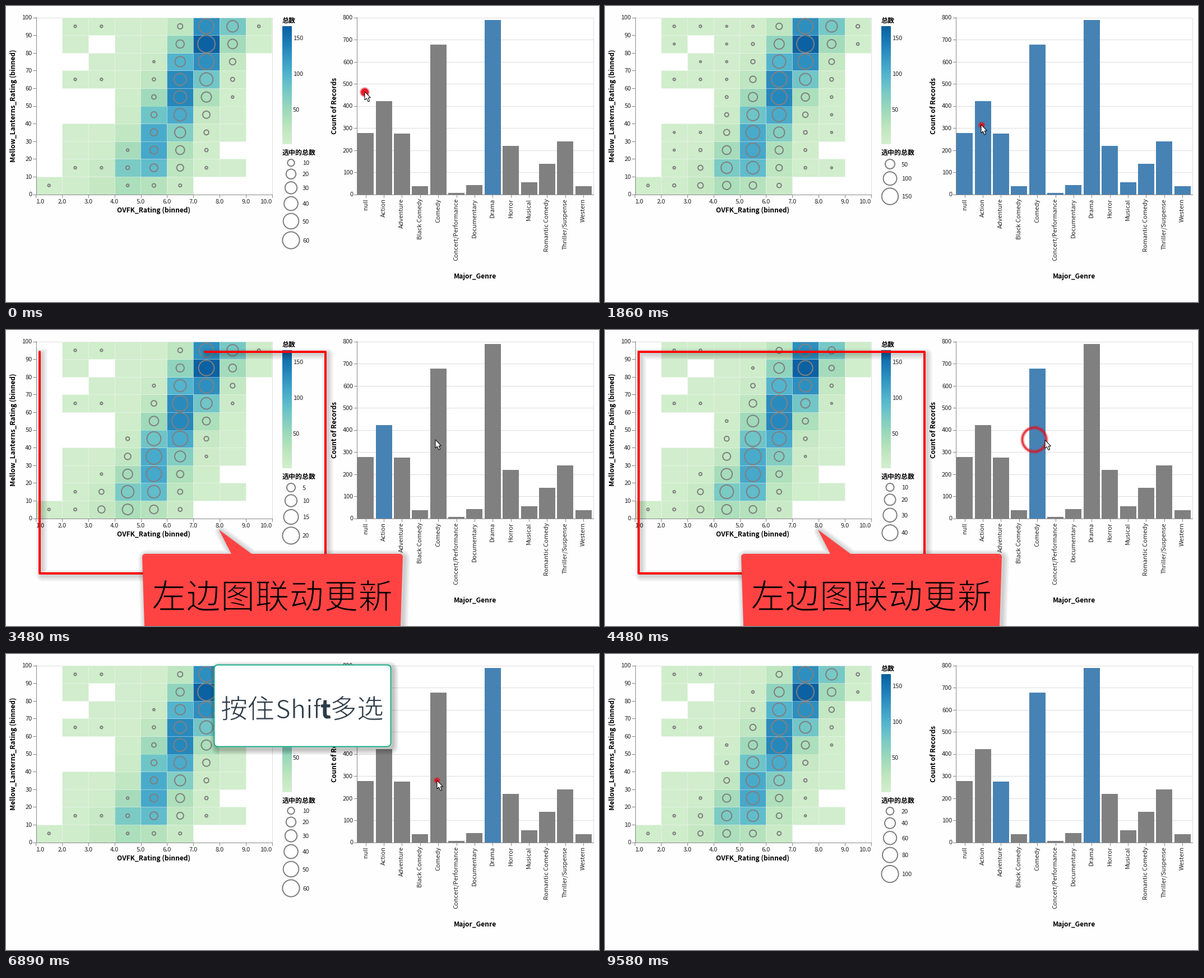
Animation, 1058 px wide and 529 px high, one loop 9.65 s. Source, as a matplotlib script:

```python
import numpy as np
import matplotlib.pyplot as plt
from matplotlib.animation import FuncAnimation
from matplotlib.collections import PolyCollection
from matplotlib.colors import LinearSegmentedColormap
from matplotlib.patches import Circle, FancyBboxPatch, PathPatch, Polygon, Rectangle
from matplotlib.path import Path
from matplotlib.patheffects import Stroke

W, H, LOOP, STEP = 1058, 529, 9650, 50
PT = 0.72  # points per pixel at 100 dpi
R_MAX = 15.5
GRAY, BLUE, INK = "#808080", "#4682b4", "#222222"
AXIS, GRID = "#888888", "#dddddd"
CJK = "Noto Sans CJK JP"

# ---------- data ----------

# filled columns of each heatmap row, bottom row first, with one hole
FIRST, LAST = [0, 1, 1, 1, 3, 3, 1, 2, 1, 1], [5, 7, 6, 7, 7, 7, 7, 7, 8, 8]
ROWS, COLS = np.array([(r, c) for r in range(10) for c in range(FIRST[r], LAST[r] + 1)
                       if (r, c) != (8, 2)]).T
LOOSE = (COLS == 0) | ((COLS <= 2) & np.isin(ROWS, (1, 6, 9)))


def ridge(start, slope, floor, heights):
    """Circle radii: a bell per row whose centre drifts right with the score."""
    height = np.interp(ROWS, [0, 1, 4, 8, 9], heights)
    width = 1.4 + 1.6 * np.exp(-ROWS)
    radii = floor + height * np.exp(-(COLS - start - slope * ROWS) ** 2 / width)
    radii = np.where(LOOSE, np.maximum(radii, 2.2), radii)
    return np.where(radii > 1.65, np.minimum(radii, R_MAX), 0)


everything = ridge(3.3, 0.33, 1.7, (5.8, 10.3, 11.8, 13.8, 12.6))
drama = ridge(4.1, 0.245, 0.6, (2.6, 6.8, 10.6, 14.9, 13.6))
action = ridge(3.15, 0.355, 0.6, (9, 12, 14.8, 13.2, 13))
comedy = ridge(3.1, 0.33, 0.7, (8, 12.5, 14.8, 13, 10.5))
pair = ridge(3.4, 0.32, 1.2, (5.2, 9, 12.3, 14.3, 13))
trio = ridge(3.3, 0.33, 1.3, (5.7, 9.5, 12.3, 14.2, 13))

RECORDS = {"null": 276, "Action": 421, "Adventure": 275, "Black Comedy": 36, "Comedy": 676,
           "Concert/Performance": 6, "Documentary": 43, "Drama": 789, "Horror": 220,
           "Musical": 54, "Romantic Comedy": 138, "Thriller/Suspense": 240, "Western": 37}

# start time, circle radii, largest count, legend step, selected bars
STATES = [
    (0, drama, 63, 10, {"Drama"}),
    (120, everything, 166, 50, set(RECORDS)),
    (2000, action, 21, 5, {"Action"}),
    (4040, comedy, 48, 10, {"Comedy"}),
    (5600, drama, 63, 10, {"Drama"}),
    (7030, pair, 102, 20, {"Comedy", "Drama"}),
    (8150, trio, 105, 20, {"Comedy", "Drama", "Adventure"}),
]
CLICKS = [(-75, 640, 154), (1850, 672, 213), (3900, 766, 196),
          (5470, 866, 199), (6860, 769, 226), (8000, 708, 246)]
MOVES = [(980, 1250, 664, 225), (1250, 1480, 671, 212), (2950, 3430, 766, 196),
         (4350, 4780, 866, 199), (6250, 6730, 769, 226), (7350, 7900, 708, 246)]

# ---------- stage ----------

fig = plt.figure(figsize=(W / 100, H / 100), dpi=100, facecolor="#fefefe")
ax = fig.add_axes([0, 0, 1, 1])
ax.axis("off")


def text(x, y, s, px=11, color=INK, z=3, **kw):
    return ax.text(x, y, s, fontsize=px * PT, family=CJK, color=color, zorder=z, **kw)


def title(x, y, s, ha="center", **kw):
    text(x, y, s, 12, "black", weight="bold", ha=ha, **kw)


def thin_text(x, y, s, px, color, back, cut, z):
    """Large light lettering: the outline is trimmed in the background colour."""
    return text(x, y, s, px, color, z, weight="light",
                path_effects=[Stroke(linewidth=cut * PT, foreground=back)])


def line(xs, ys, color=AXIS, px=1, z=2, **kw):
    return ax.plot(xs, ys, color=color, lw=px * PT, zorder=z, **kw)[0]


def gx(rating):
    return 53.3 + (rating - 1) * 46.8


def gy(score):
    return 336.5 - score * 3.16


def by(records):
    return 336.5 - records * 0.395


# heatmap
cmap = LinearSegmentedColormap.from_list("greenblue", [
    "#d3eece", "#c5e8c3", "#b1e1bb", "#9bd8bb", "#82cec2", "#69c2ca",
    "#51b2cd", "#3c9fc7", "#288abd", "#1675b1", "#0b60a1"])
CX, CY = gx(COLS + 1.5), gy(10 * ROWS + 5)
ax.add_patch(Rectangle((53.5, 20.5), 421, 316, fc="white", ec=GRID, lw=PT, zorder=0))
corners = np.array([(-23.4, -15.8), (23.4, -15.8), (23.4, 15.8), (-23.4, 15.8)])
ax.add_collection(PolyCollection([corners + c for c in zip(CX, CY)],
                                 facecolors=cmap((everything / R_MAX) ** 2),
                                 edgecolors=(1, 1, 1, 0.3), linewidths=0.5, zorder=1))
line([53.5, 53.5], [20, 337])
line([53, 474.5], [336.5, 336.5])
for score in range(0, 101, 10):
    y = gy(score)
    line([48, 53], [y, y])
    text(46.5, y + 4, str(score), ha="right")
for rating in range(1, 11):
    x = gx(rating)
    line([x, x], [337, 342])
    side = {1: "left", 10: "right"}.get(rating, "center")
    text(x, 353, f"{rating}.0", ha=side)
title(263.5, 368.5, "OVFK_Rating (binned)")
title(13, 178.5, "Mellow_Lanterns_Rating (binned)", rotation=90, va="center")

# colour legend
title(493, 29.5, "总数", "left")
ax.imshow(np.linspace(1, 0, 256)[:, None], cmap=cmap, extent=(492.5, 509.5, 247.5, 37),
          aspect="auto", zorder=1)
for n in (50, 100, 150):
    text(512, 253 - n * 1.28, str(n))
title(493, 266, "选中的总数", "left")

# bar chart
ax.add_patch(Rectangle((625.5, 20.5), 422, 316, fc="white", ec=GRID, lw=PT, zorder=0))
for n in range(0, 801, 100):
    y = by(n)
    line([626, 1047.5], [y, y], GRID, z=1)
    line([620.5, 625.5], [y, y])
    text(619, y + 4, str(n), ha="right")
line([625.5, 625.5], [20, 337])
bars = {}
for k, (genre, n) in enumerate(RECORDS.items()):
    x = 641.7 + k * 32.37
    bars[genre] = ax.add_patch(Rectangle((x - 14.5, by(n)), 29, n * 0.395, lw=0, zorder=1.5))
    line([x, x], [337, 342])
    text(x, 344, genre, rotation=90, ha="center", va="top")
line([625, 1048], [336.5, 336.5])
title(836.5, 487, "Major_Genre")
title(586, 178.5, "Count of Records", rotation=90, va="center")

# circles and size legend
rings = ax.scatter([], [], facecolors="none", edgecolors=GRAY, linewidths=2 * PT, zorder=2.5)
size_labels = [text(529, 0, "") for _ in range(6)]

# ---------- annotations ----------

SOFT = range(4, 21, 4)  # stacked stroke widths of a soft shadow


def fader(parts):
    """Remember each artist's own alpha so that a group fades together."""
    base = [(p, 1 if p.get_alpha() is None else p.get_alpha()) for p in parts]

    def fade(level):
        for part, alpha in base:
            part.set_alpha(alpha * level)
            part.set_visible(level > 0)
    return fade


FRAME = np.array([(60, 39), (60, 435), (570, 435), (570, 39), (60, 39)], float)
RUN = np.concatenate([[0], np.cumsum(np.abs(np.diff(FRAME, axis=0)).sum(axis=1))])
strokes = [(line([], [], "black", w, 5, alpha=0.035, solid_joinstyle="round"), 4) for w in SOFT]
strokes.append((line([], [], "#ff0000", 4, 5.1, solid_joinstyle="round",
                     solid_capstyle="round"), 0))
fade_frame = fader([s for s, _ in strokes])


def bubble(shift=0):
    points = np.array([(247.5, 545), (243, 406), (243, 400), (249, 400), (402, 400), (380, 357),
                       (438, 400), (702, 400), (708, 400), (708, 406), (703.5, 545)])
    return Path(points + shift, [1, 2, 3, 3, 2, 2, 2, 2, 3, 3, 2])


def shape(path, z, **kw):
    return ax.add_patch(PathPatch(path, joinstyle="round", zorder=z, **kw))


callout = [shape(bubble(3), 6, fc="none", ec="black", lw=w * PT, alpha=0.04) for w in SOFT]
callout.append(shape(bubble(), 6.1, fc="#ff4343", lw=0))
callout.append(thin_text(260, 498, "左边图联动更新", 61.4, "black", "#ff4343", 1.7, 6.2))
fade_callout = fader(callout)


def card(x, y, z, **kw):
    return ax.add_patch(FancyBboxPatch((x, y), 315, 146, zorder=z,
                                       boxstyle="round,pad=0,rounding_size=7", **kw))


popup = [card(375, 24, 7, fc="none", ec="black", lw=w * PT, alpha=0.05) for w in SOFT]
popup.append(card(371.5, 19.5, 7.1, fc="white", ec="#1aae88", lw=2 * PT))
popup += [thin_text(x, 115, s, px, "#2f3c48", "white", 1.1, 7.2)
          for x, s, px in ((383, "按住", 48), (481, "Shif", 45), (578, "多选", 48))]
popup.append(text(561, 115, "t", 45, "#2f3c48", 7.2, weight="bold"))
fade_popup = fader(popup)

# ---------- pointer ----------

ripple = [(ax.add_patch(Circle((0, 0), 1, fc="none", ec="#e0101f", lw=w * PT, zorder=8)), a)
          for w, a in ((8, 0.2), (5.5, 0.4), (3, 0.85))]
dot = ax.add_patch(Circle((0, 0), 1, fc="#f01020", lw=0, zorder=8))
ARROW = np.array([(0, 0), (0, 15), (3.4, 12), (6, 18), (8.6, 17), (6.2, 11), (10.5, 11)])
pointer = ax.add_patch(Polygon(ARROW, fc="white", ec="black", lw=PT, zorder=9))

ax.set_xlim(0, W)
ax.set_ylim(H, 0)

# ---------- motion ----------


def ramp(t, start, end):
    return min(1.0, max(0.0, (t - start) / (end - start)))


def show_state(t):
    _, radii, top, step, chosen = [s for s in STATES if s[0] <= t][-1]
    seen = radii > 0
    ticks = np.arange(step, top, step)
    tick_r = R_MAX * np.sqrt(ticks / top)
    tick_y = 274 + 2 * np.cumsum(tick_r) - tick_r + 5.2 * np.arange(len(ticks))
    xs = np.concatenate([CX[seen], np.full(len(ticks), 508.5)])
    ys = np.concatenate([CY[seen], tick_y])
    rings.set_offsets(np.column_stack([xs, ys]))
    rings.set_sizes((2 * PT * np.concatenate([radii[seen], tick_r])) ** 2)
    for label in size_labels:
        label.set_text("")
    for label, n, y in zip(size_labels, ticks, tick_y):
        label.set_text(str(n))
        label.set_y(y + 4)
    for genre, bar in bars.items():
        bar.set_facecolor(BLUE if genre in chosen else GRAY)


def show_notes(t):
    leave = 1 - ramp(t, 5850, 6150)
    fade_callout(ramp(t, 2450, 2750) * leave)
    fade_popup(ramp(t, 6200, 6500) * (1 - ramp(t, 7250, 7550)))
    drawn = RUN[-1] * ramp(t, 2750, 3610)
    tip = [np.interp(drawn, RUN, FRAME[:, 0]), np.interp(drawn, RUN, FRAME[:, 1])]
    path = np.vstack([FRAME[RUN < drawn], tip])
    for stroke, shift in strokes:
        stroke.set_data(*(path + shift).T)
    fade_frame((drawn > 0) * leave)


def show_pointer(t):
    start, x, y = [c for c in CLICKS if c[0] <= t][-1]
    p = ramp(t, start, start + 1200)
    level = min(1, 1.5 * (1 - p))
    for ring, alpha in ripple:
        ring.set_center((x, y))
        ring.set_radius(2 + 41 * p)
        ring.set_alpha(alpha * level)
    dot.set_center((x, y))
    dot.set_radius(2 + 41 * p)
    dot.set_alpha(1 - ramp(p, 0.06, 0.2))

    pos = np.array([640.0, 153.0])
    for a, b, mx, my in MOVES:
        k = ramp(t, a, b)
        pos += (np.array([mx, my]) - pos) * (k * k * (3 - 2 * k))
    pointer.set_xy(ARROW + pos)
    pointer.set_alpha(1 - ramp(t, 9440, 9560))


def draw(i):
    t = i * STEP + 20
    show_state(t)
    show_notes(t)
    show_pointer(t)
    return []


anim = FuncAnimation(fig, draw, frames=LOOP // STEP, interval=STEP, repeat=True, repeat_delay=0)
plt.show()
```
